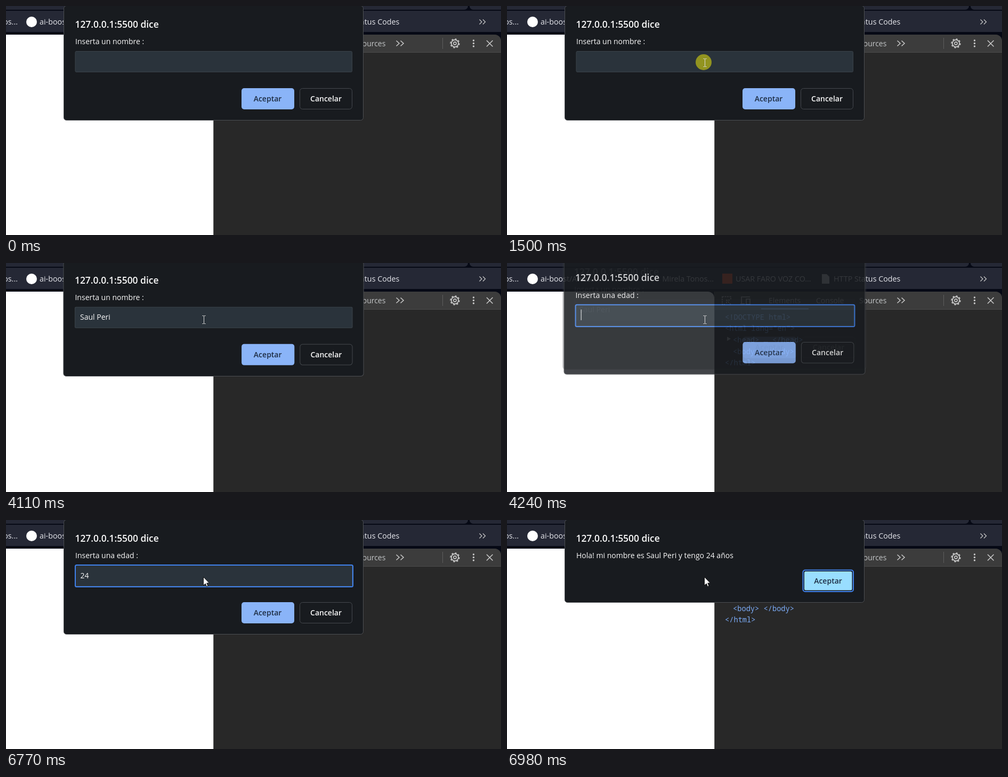
These frames come from a looping animation (929x432 px, 8000 ms). An HTML page:

```html
<!DOCTYPE html>
<html lang="es">
<head>
<meta charset="utf-8">
<title>Prompt</title>
<style>
  html, body { margin: 0; height: 100%; overflow: hidden; background: #060915; }
  svg { display: block; width: 929px; height: 432px; }
  text { font: 14px "Open Sans", sans-serif; fill: #fafafa; white-space: pre; }
  .title { font-size: 17.4px; font-weight: 600; }
  .btn { font-weight: 600; text-anchor: middle; }
  .bar text { font-size: 14.3px; fill: #e6e7ec; }
  .tabs text { fill: #c4c6c8; }
  .code text { font: 13.7px "Noto Sans Mono", monospace; fill: #7cacf8; }
  .line { fill: none; stroke: #c7c7c7; stroke-width: 1.6; }
</style>
</head>
<body>
<svg viewBox="0 0 929 432">
  <!-- browser bars -->
  <g class="bar">
    <g fill="#252835">
      <rect x="-20" y="-20" width="887" height="27" rx="7"/>
      <rect x="870" y="-20" width="90" height="27" rx="7"/>
      <rect x="-20" y="9" width="957" height="40" rx="8"/>
    </g>
    <text x="22" y="35" text-anchor="end">os...</text>
    <circle cx="48" cy="30" r="10" fill="#fff"/>
    <text x="63" y="35">ai-boost/Awes...</text>
    <text x="388" y="35" text-anchor="end">Mirela Tonos...</text>
    <rect x="404" y="20" width="19" height="19" fill="#f25022"/>
    <text x="429" y="35">USAR FARO VOZ CO...</text>
    <path d="M591 21h9l5 5v13h-14z" fill="#c3c5ca"/>
    <text x="613" y="35">HTTP Status Codes</text>
    <path class="line" d="M888.500 25.500l4.500 4.500-4.500 4.500M895 25.500l4.500 4.500-4.500 4.500" style="stroke-width:1.300"/>
  </g>

  <!-- page and developer tools -->
  <path d="M389 54H917a12 12 0 0 1 12 12V432H389z" fill="#282828"/>
  <path d="M389 54H917a12 12 0 0 1 12 12V88H389z" fill="#3c3c3c"/>
  <path d="M390 87.500H929" stroke="#4b4b4b"/>
  <path d="M389.500 54V432" stroke="#5e5e5e"/>
  <path d="M0 54H377a12 12 0 0 1 12 12V432H0z" fill="#fff"/>
  <g class="tabs">
    <path class="line" d="M404 63.500h16v5M404 63v15h5M420 78l-8-8m0 6v-6h6" stroke-dasharray="3 1.500"/>
    <path class="line" d="M440 76V64h16M438 77h8M449 68h7v10h-7z"/>
    <text x="491" y="76">Elements</text>
    <path d="M477 86.500H566" stroke="#7cacf8" stroke-width="2"/>
    <text x="580" y="76">Console</text>
    <text x="661" y="76">Sources</text>
    <path class="line" d="M732.500 65.500l5.500 5-5.500 5M740.500 65.500l5.500 5-5.500 5"/>
    <path d="M819.500 60V81" stroke="#5e5e5e"/>
    <g class="line">
      <circle cx="842.500" cy="70.500" r="2.600"/>
      <circle cx="842.500" cy="70.500" r="6.600" style="stroke-width:1.800"/>
      <circle cx="842.500" cy="70.500" r="8.200" pathLength="16" stroke-dasharray="1" style="stroke-width:2"/>
    </g>
    <g fill="#c7c7c7">
      <circle cx="877.500" cy="65" r="1.700"/>
      <circle cx="877.500" cy="70.500" r="1.700"/>
      <circle cx="877.500" cy="76" r="1.700"/>
    </g>
    <path class="line" d="M902 65l11.500 11.500M913.500 65L902 76.500"/>
  </g>
  <g class="code">
    <text x="409" y="107">&lt;!DOCTYPE html&gt;</text>
    <text x="409" y="128">&lt;html lang="en"&gt;</text>
    <path d="M413 139l7 4-7 4z" fill="#aaa"/>
    <text x="424" y="150">&lt;head&gt; … &lt;/head&gt;</text>
    <text x="424" y="172">&lt;body&gt; &lt;/body&gt;</text>
    <text x="409" y="193">&lt;/html&gt;</text>
  </g>

  <g id="dialogs"></g>
  <circle id="click" cx="369" cy="106" r="15" fill="#929420"/>
  <path id="arrow" d="M.5 .5V16.500L4.200 13 6.500 18.500 9 17.500 6.700 12H11.500z" fill="#fff" stroke="#111"/>
  <path id="beam" d="M-3 -7.500H-.5M.5 -7.500H3M-3 7.500H-.5M.5 7.500H3M0 -7V7" fill="none" stroke="#dcdcdc"/>
</svg>
<script>
const LOOP = 8000, NAME = 'Saul Peri', AGE = '24';
const $ = id => document.getElementById(id);
const clamp = v => Math.max(0, Math.min(1, v));
const show = (el, on) => el.setAttribute('visibility', on ? 'inherit' : 'hidden');

const frame = (id, height, message, body) => `<g id="${id}">
  <rect x="108.500" y="-.5" width="562" height="${height}" rx="5" fill="#181b1f" stroke="#4c4f53"/>
  <text class="title" x="129.500" y="41">127.0.0.1:5500 dice</text>
  <text x="130" y="72">${message}</text>${body}</g>`;

const prompt = (id, message) => frame(id, 216, message, `
  <rect x="130" y="85.500" width="519.500" height="39" rx="2" fill="#2a333b" stroke="#3b434a"/>
  <rect class="ring" x="130" y="85" width="521" height="41" rx="2.500" fill="none" stroke="#3f82ee" stroke-width="2"/>
  <text class="value" x="139.500" y="109.500"></text>
  <rect class="caret" y="94" width="1" height="20" fill="#fff"/>
  <rect x="442" y="155" width="99" height="40" rx="5" fill="#8ab4f8"/>
  <text class="btn" x="491" y="180" style="fill:#1d2c42">Aceptar</text>
  <rect x="551.500" y="155.500" width="98" height="39" rx="5" fill="none" stroke="#45494e"/>
  <text class="btn" x="600.500" y="180">Cancelar</text>`);

$('dialogs').innerHTML =
  prompt('name', 'Inserta un nombre :') +
  prompt('age', 'Inserta una edad :') +
  frame('greeting', 156, `Hola! mi nombre es ${NAME} y tengo ${AGE} años`, `
    <rect x="555.500" y="94.500" width="94.500" height="40.500" rx="4" fill="none" stroke="#3f82ee" stroke-width="2"/>
    <rect x="558" y="97" width="89.500" height="35.500" rx="2.500" fill="#99deff"/>
    <text class="btn" x="602.500" y="120" style="fill:#1d2c42">Aceptar</text>`);

// Windows fade in while dropping into place; they start to rise, then fade out.
function pose(id, t, opens, closes) {
  const o = clamp((t - opens) / 100), c = clamp((t - closes) / 190);
  const lift = 28 * (1 - o) ** 2 + 23 * c;
  const alpha = Math.min(1, o * 1.6) * (1 - clamp((t - closes - 30) / 160));
  const k = 1 + lift * 0.0008;
  $(id).setAttribute('transform', `translate(${390 * (1 - k)} ${-lift}) scale(${k})`);
  $(id).setAttribute('opacity', alpha);
}

function field(id, t, text, keys, focus, blinks) {
  const part = name => $(id).querySelector('.' + name);
  const value = part('value'), count = keys.filter(k => t >= k).length;
  value.textContent = text.slice(0, count);
  const width = count ? value.getComputedTextLength() : 0;
  part('caret').setAttribute('x', Math.round(139.6 + width));
  show(part('caret'), blinks.some(([on, off]) => t >= on && t < off));
  show(part('ring'), t >= focus[0] && t < focus[1]);
}

function draw(now) {
  const t = now % LOOP;
  pose('name', t, -200, 4090);
  pose('age', t, 4190, 6790);
  pose('greeting', t, 6880, LOOP);
  field('name', t, NAME, [2230, 2440, 2510, 2590, 2660, 2870, 3140, 3320, 3480],
    [1560, 4090], [[1560, 2050], [2230, 4010]]);
  field('age', t, AGE, [5690, 5950],
    [4190, 6790], [[4190, 4610], [5130, 5660], [5690, 6470]]);

  const left = 1 - clamp((t - 220) / 1050);
  const x = Math.round(370 + 449 * left ** 1.87), y = Math.round(107 + 325 * left ** 1.23);
  const typing = y < 125 && t < 6770;
  $('arrow').setAttribute('transform', `translate(${x} ${y})`);
  $('beam').setAttribute('transform', `translate(${x + 1.5} ${y})`);
  show($('arrow'), !typing);
  show($('beam'), typing);
  show($('click'), t >= 1500 && t < 1710);
}

function tick() {
  draw(performance.now());
  requestAnimationFrame(tick);
}
tick();
</script>
</body>
</html>
```
